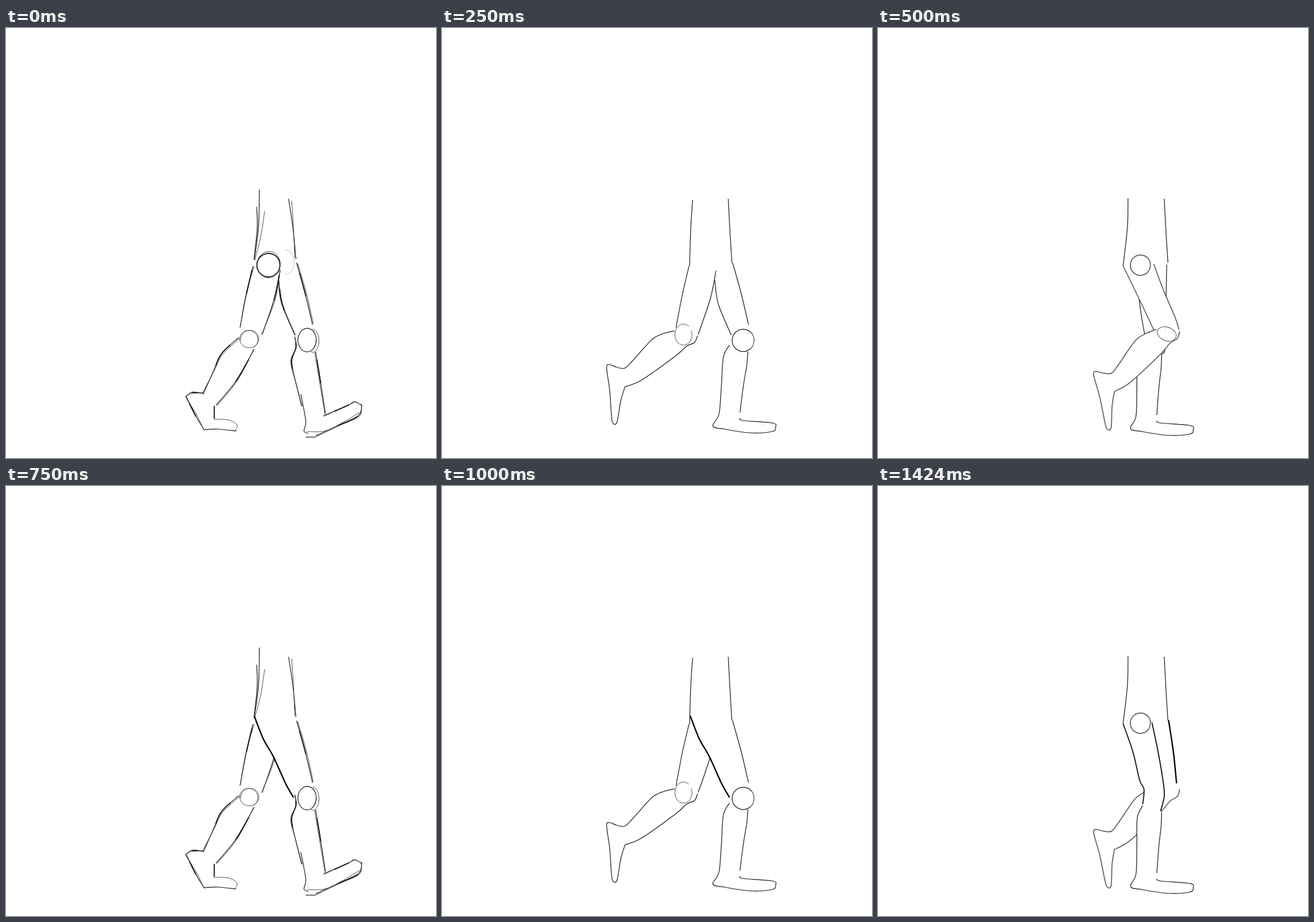
These frames come from a looping animation (700 by 700 pixels, 1540 ms). An HTML page:

```html
<!DOCTYPE html>
<html lang="en">
<head>
<meta charset="utf-8">
<title>Walk cycle</title>
<style>
  html, body { margin: 0; width: 100%; height: 100%; overflow: hidden; background: #fff; }
  svg { display: block; width: 100%; height: 100%; }
  path { fill: none; stroke: #222; stroke-width: 1.2; stroke-linejoin: round; }
  .skin { fill: #fff; stroke: none; }
  .faint { stroke: #aaa; stroke-width: .7; }
  .thin { stroke: #444; stroke-width: .9; }
  .soft { stroke: #555; stroke-width: 1.5; }
  .bold { stroke: #111; stroke-width: 1.7; }
  .heavy { stroke: #000; stroke-width: 2.2; }
</style>
</head>
<body>
<svg viewBox="0 0 700 700"></svg>
<script>
const LOOP = 1540, STEP = 250;
const svg = document.querySelector('svg');
let layer = svg;

function add(tag, attrs) {
  const node = document.createElementNS('http://www.w3.org/2000/svg', tag);
  for (const key in attrs) node.setAttribute(key, attrs[key]);
  return layer.appendChild(node);
}

function group(transform, draw) {
  const parent = layer, node = add('g', { transform });
  layer = node;
  draw();
  layer = parent;
  return node;
}

const points = text => text.split(' ').map(p => p.split(',').map(Number));

// Repeatable noise between -1 and 1.
function noise(i, seed) {
  const n = Math.sin(i * 12.9898 + seed * 78.233) * 43758.5453;
  return (n - Math.floor(n)) * 2 - 1;
}

// Catmull-Rom curve as cubic Béziers.
function curve(pts) {
  const at = i => pts[Math.max(0, Math.min(pts.length - 1, i))];
  const handle = (p, from, to) => p.map((v, k) => (v + (to[k] - from[k]) / 6).toFixed(2));
  let d = `M${pts[0]}`;
  for (let i = 0; i < pts.length - 1; i++) {
    const a = at(i), b = at(i + 1);
    d += `C${handle(a, at(i - 1), b)} ${handle(b, at(i + 2), a)} ${b}`;
  }
  return d;
}

const ink = (text, pen = '') => add('path', { d: curve(points(text)), class: pen });

// A loose pencil line: one main pass, one stray pass, one pressed-down stretch.
function sketch(text) {
  const pts = points(text), seed = pts[0][0] + pts[0][1];
  const stray = pts.map((p, i) => p.map((v, k) => v + 2 * noise(2 * i + k, seed)));
  const from = 25 + 20 * noise(20, seed);
  add('path', { d: curve(pts) });
  add('path', { d: curve(stray), class: 'thin' });
  add('path', {
    d: curve(pts), class: 'bold', pathLength: 100,
    'stroke-dasharray': '38 200', 'stroke-dashoffset': -from
  });
}

function ring(x, y, rx, ry, pen, turns = 1, start = 0, drift = .015) {
  const count = Math.ceil(turns * 14), pts = [];
  for (let i = 0; i <= count; i++) {
    const a = start + turns * 2 * Math.PI * i / count;
    const r = 1 + drift * Math.sin(a * 1.4);
    pts.push([x + rx * r * Math.cos(a), y + ry * r * Math.sin(a)]);
  }
  add('path', { d: curve(pts), class: pen });
}

// An opaque body part with two drawn edges.
function limb(edgeA, edgeB, drawA = ink, drawB = drawA) {
  const back = curve(points(edgeB).reverse()).replace('M', 'L');
  add('path', { d: curve(points(edgeA)) + back, class: 'skin' });
  drawA(edgeA);
  drawB(edgeB);
}

const with_ = pen => text => ink(text, pen);

function liftedLeg(x, y, turn, pen) {
  group(`translate(${x} ${y}) rotate(${turn})`, () => limb(
    '82,-61 65,-57 45,-47 13,-12 0,0 -13,-2 -24,-6 -29,-1 -24,36 -21,79 -18,90 -12,87 -6,53 1,30',
    '119,-53 114,-42 101,-36 83,-20 28,19 1,30', with_(pen)));
}

function plantedLeg(x, y, lean) {
  group(`translate(${x} ${y}) skewX(${lean})`, () => limb(
    '27,-132 17,-112 14,-68 10,-20 0,0 19,5 60,11 96,9 102,2 97,-5 49,-9 44,-13',
    '57,-121 55,-98 50,-68 44,-22', with_('')));
}

// Spread thighs; with the front leg nearer, its edge runs across up to the hip.
function thighs(frontNear, line) {
  limb('402,388 391,435 381,488', '446,395 437,440 417,499', line);
  const outer = '473,382 487,432 499,483';
  if (frontNear) limb(outer, '404,374 419,412 435,440 455,484 468,507', line, with_('heavy'));
  else limb(outer, '444,410 450,450 471,500', line);
}

function stride(frontNear) {
  ink('412.5,263 411,325 404,378');
  ink('408,291 409,325 404,375');
  ink('421,298 415,338 405,378', 'thin');
  ink('460,278 467,325 472,376');
  ink('465,281 468,325 470,374', 'thin');
  thighs(frontNear, sketch);
  if (!frontNear) {
    ring(427, 386, 19, 19, 'bold', 1);
    ring(427, 385, 19, 21, 'thin', 1.2, 1, .04);
    ring(455, 381, 14, 20, 'faint', .5, -Math.PI / 2);
  }
  // trailing leg
  ring(396, 507, 15, 14.5, 'thin', 1.7, 3, .06);
  sketch('379,504 351,530 338,558 321,596');
  sketch('404,523 375,574 342,614');
  sketch('321,594 303,594 293,599');
  sketch('293,599 308,630 323,655');
  ink('322,654 345,653 375,656');
  ink('339,615 339,636', 'bold');
  ink('338,637 362,638 376,646 373,656', 'thin');
  // leading leg
  ring(490, 508, 15, 19, '', 1.1);
  ring(499, 508, 10.5, 19, 'thin', .55, -Math.PI / 2, .05);
  sketch('470,503 472,520 465,543 472,578 482,616');
  ink('480,596 488,640 485,656 492,660');
  sketch('504,527 513,582 520,628');
  sketch('517,632 557,614 568,609 579,614');
  sketch('579,613 574,631 541,647 504,664');
  ink('490,657 519,656 545,644 579,624', 'thin');
  ink('488,666 504,666');
}

function torso(left) {
  ink(left);
  ink('466,278 469,335 472,382');
}

function pushOff(frontNear) {
  torso('408,280 405,325 403,388');
  thighs(frontNear, with_(''));
  liftedLeg(297, 554, 0, '');
  ring(393, 499, 14, 17, 'thin', .92, -.4);
  plantedLeg(441, 648, 0);
  ring(490, 508.5, 18, 18, '');
  ring(492, 508, 16, 19, 'faint', .3, -.9);
}

function passing(plantedNear) {
  const planted = () => plantedLeg(411, 652, 3);
  const lifted = () => liftedLeg(380, 562, -7.6, 'soft');
  torso('407,277 406,325 399,387');
  if (plantedNear) {
    ink('473,381 481,434 486,484', 'heavy');
    lifted();
    planted();
    limb('399,387 415,433 426,479 433,494 431,518',
         '446,385 456,433 464,480 466,505 460,529', with_('bold'));
  } else {
    ink('425,442 429,470 434,498');
    ink('470,385 469,440 468,518 462,531');
    planted();
    limb('399,387 413,416 437,466 449,492', '449,384 464,425 484,472 490,491', with_('soft'));
    lifted();
    group('rotate(22 470 498)', () => ring(470, 498, 16, 11, 'thin'));
  }
  ring(427, 386, 16.5, 16.5, 'soft');
}

const poses = [false, true].flatMap(near =>
  [stride, pushOff, passing].map(pose => group('', () => pose(near))));

function draw(ms) {
  const current = Math.min(poses.length - 1, Math.floor(ms % LOOP / STEP));
  poses.forEach((node, i) => { node.style.display = i === current ? '' : 'none'; });
}

const start = performance.now();
function tick() {
  draw(performance.now() - start);
  requestAnimationFrame(tick);
}
tick();
</script>
</body>
</html>
```
